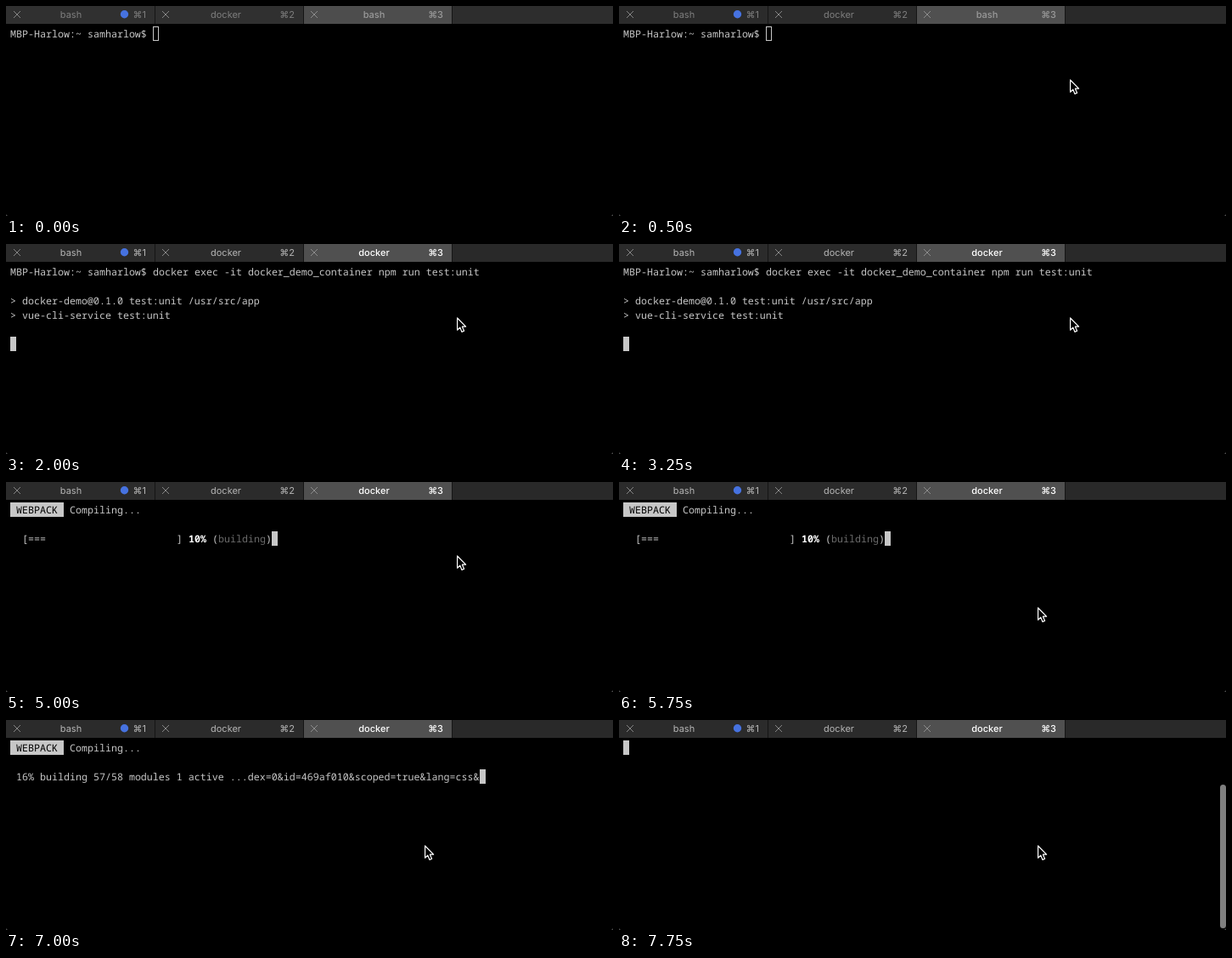
Animation of 715 by 247 pixels, one loop 8 s. Source, as an HTML page:

```html
<!DOCTYPE html>
<html lang="en">
<head>
<meta charset="utf-8">
<title>Terminal</title>
<style>
html, body { margin: 0; width: 100%; height: 100%; overflow: hidden; background: #000; }
svg { display: block; width: 715px; height: 247px; }
text { white-space: pre; text-rendering: geometricPrecision; }
#screen text { font: 11.667px "Noto Sans Mono", monospace; fill: #c7c7c7; }
#screen .bold { font-weight: 700; fill: #fff; }
#screen .dim { fill: #6b6b6b; }
#screen .dark { fill: #000; }
#tabs text { font: 11px Inter, "DejaVu Sans", sans-serif; }
#tabs .on text { font-weight: 500; }
</style>
</head>
<body>
<svg viewBox="0 0 715 247">
  <rect width="715" height="247"/>
  <g id="tabs"></g>
  <g id="screen"></g>
  <path d="M0 244.5Q.4 246.6 2.5 247H0ZM715 244.5Q714.6 246.6 712.5 247H715Z" fill="#555"/>
  <rect id="bar" x="708" y="76" width="7" height="169" rx="3.5" fill="#7f7f7f"/>
  <path id="mouse" d="M.6 1V15.2L3.8 12.2 6 17.4 8.6 16.3 6.4 11.2H10.6Z" stroke="#fff" stroke-width="1.2" stroke-linejoin="round"/>
</svg>
<script>
const LOOP = 8000, CELL = 7, ROW = 17, LEFT = 5, TOP = 24;
const $ = id => document.getElementById(id);

const esc = s => s.replace(/&/g, '&amp;').replace(/</g, '&lt;').replace(/>/g, '&gt;');
const put = (col, row, s, cls = '') =>
  `<text class="${cls}" x="${LEFT + col * CELL}" y="${TOP + row * ROW + 13}">${esc(s)}</text>`;
const block = (col, row, n = 1) =>
  `<rect x="${LEFT + col * CELL}" y="${TOP + row * ROW}" width="${n * CELL}" height="${ROW}" fill="#c7c7c7"/>`;
const hollow = (col, row) =>
  `<rect x="${LEFT + col * CELL + .5}" y="${TOP + row * ROW + .5}" width="6" height="16" fill="none" stroke="#c7c7c7"/>`;

const prompt = put(0, 0, 'MBP-Harlow:~ samharlow$');
const command = prompt + put(24, 0, 'docker exec -it docker_demo_container npm run test:unit');
const script = command
  + put(0, 2, '> docker-demo@0.1.0 test:unit /usr/src/app')
  + put(0, 3, '> vue-cli-service test:unit');
const header = block(0, 0, 9) + put(1, 0, 'WEBPACK', 'dark') + put(10, 0, 'Compiling...');

// Progress bar, 25 cells wide, with a dim message in brackets
function progress(pct, msg) {
  const end = 35 + msg.length;
  return header + put(2, 2, '[' + '='.repeat(Math.round(pct / 4))) + put(28, 2, ']')
    + put(30, 2, pct + '%', 'bold') + put(34, 2, '(') + put(35, 2, msg, 'dim')
    + put(end, 2, ')') + block(end + 1, 2);
}

function modules(pct, done, active, path) {
  const s = `${pct}% building ${done} modules ${active} active ...${path}`;
  return header + put(1, 2, s) + block(1 + s.length, 2);
}

// Each step keeps what it does not change
const steps = [
  { at: 0, screen: prompt + hollow(24, 0), title: 'bash', lit: false, focus: false, mouse: null, bar: false },
  { at: 250, lit: true, mouse: [583, 23] },
  { at: 500, mouse: [531, 86] },
  { at: 750, focus: true, screen: prompt + block(24, 0) },
  { at: 1250, screen: command + block(0, 1) },
  { at: 2000, screen: script + block(0, 5), title: 'docker' },
  { at: 5000, screen: progress(10, 'building') },
  { at: 5250, mouse: [499, 128] },
  { at: 5500, mouse: [495, 136] },
  { at: 5750, mouse: [493, 147] },
  { at: 6000, screen: progress(10, 'building 0/1 modules 1 active /usr/src/app/tests.js') },
  { at: 6250, screen: modules(11, '16/22', 6, '&type=template&id=469af010&scoped=true&') },
  { at: 6500, screen: modules(13, '30/41', 11, '_modules/core-js/internals/to-object.js') },
  { at: 7000, screen: modules(16, '57/58', 1, 'dex=0&id=469af010&scoped=true&lang=css&') },
  { at: 7500, screen: progress(95, 'emitting') },
  { at: 7750, screen: block(0, 0), bar: true }
];

function tab(i, name, s) {
  const x = i * 175 + (i ? 1 : 0), on = i === 2;
  const bg = on ? (s.lit ? '#505050' : '#4d4d4d') : (s.lit ? '#2b2b2b' : '#303030');
  const ink = s.focus ? (on ? '#fff' : '#b5b5b5') : (on ? '#9a9a9a' : '#7e7e7e');
  const mid = [76.5, 259, 433.5][i], cross = 13 + i * 175;
  return `<g class="${on ? 'on' : ''}" fill="${ink}">
    <rect x="${x}" width="${i ? 174 : 175}" height="21" fill="${bg}"/>
    <path d="M${cross - 4} 6l8 8m0-8l-8 8" stroke="${on ? '#8c8c8c' : '#858585'}"/>
    <text x="${mid}" y="14" text-anchor="middle">${name}</text>
    <text x="${165 + i * 175}" y="14" text-anchor="end">⌘${i + 1}</text></g>`;
}

function drawTabs(s) {
  return '<rect width="715" height="21" fill="#151515"/>'
    + `<rect x="526" width="189" height="21" fill="${s.lit ? '#292929' : '#2d2d2d'}"/>`
    + ['bash', 'docker', s.title].map((name, i) => tab(i, name, s)).join('')
    + '<circle cx="139.5" cy="9.7" r="4.7" fill="#4672e0"/>';
}

let shown = -1;
function draw(t) {
  const past = steps.filter(s => s.at <= t);
  if (past.length === shown) return;
  shown = past.length;
  const s = Object.assign({}, ...past);
  $('tabs').innerHTML = drawTabs(s);
  $('screen').innerHTML = s.screen;
  $('bar').style.display = s.bar ? '' : 'none';
  $('mouse').style.display = s.mouse ? '' : 'none';
  if (s.mouse) $('mouse').setAttribute('transform', `translate(${s.mouse})`);
}

const start = performance.now();
function tick() {
  draw((performance.now() - start) % LOOP);
  requestAnimationFrame(tick);
}
tick();
</script>
</body>
</html>
```
